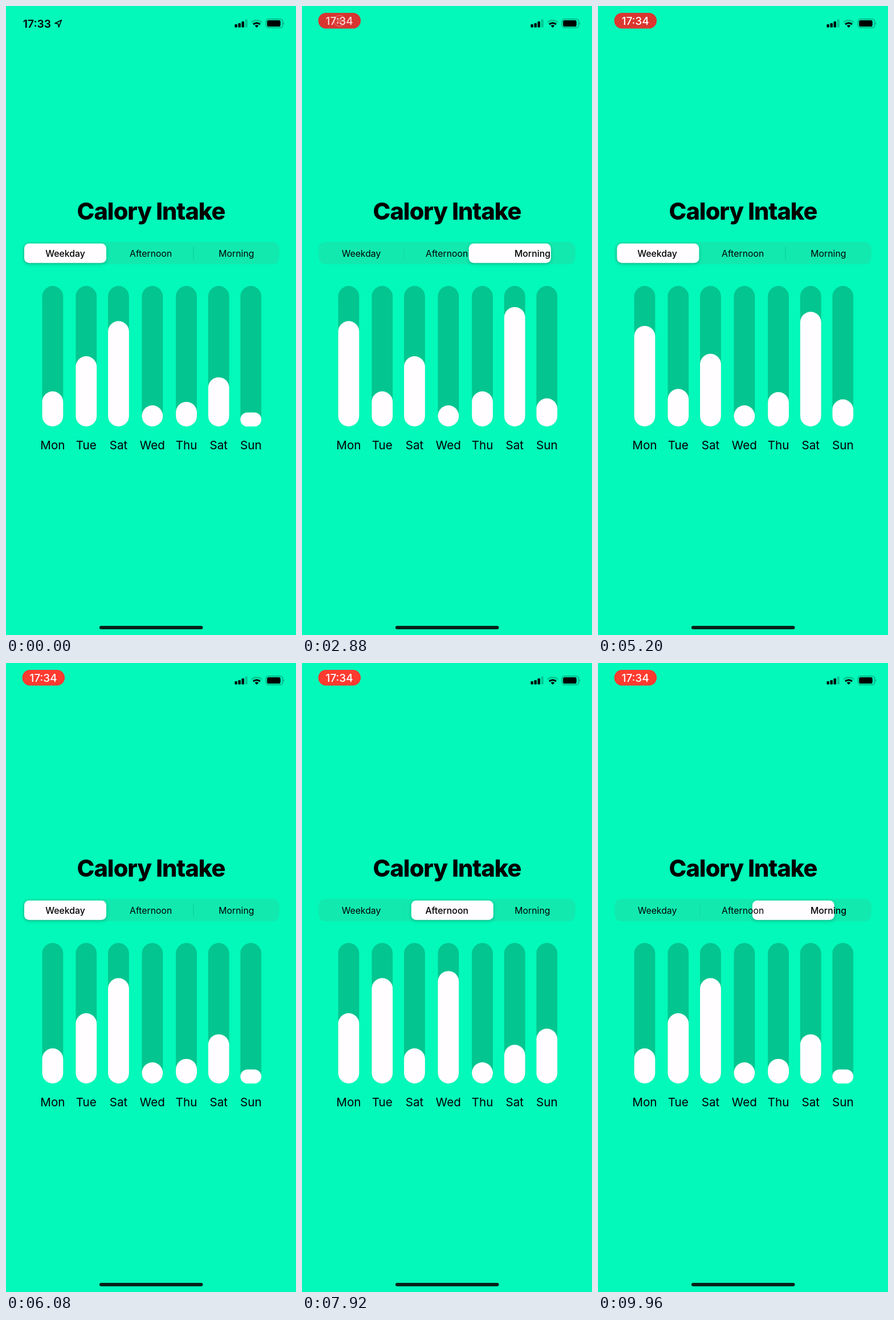
Animation of 509 by 1101 pixels, one loop 10 s. Source, as an HTML page:

```html
<!DOCTYPE html>
<html lang="en">
<head>
<meta charset="utf-8">
<title>Calory Intake</title>
<style>
  html, body { margin: 0; width: 100%; height: 100%; overflow: hidden; background: #02f9b9; }
  svg { display: block; width: 100vw; height: 100vh; }
  text { font-family: Inter, "Open Sans", sans-serif; font-optical-sizing: none; text-anchor: middle; }
  .title { font-size: 41.5px; font-weight: 800; letter-spacing: -1px; }
  .day { font-size: 20.7px; }
  .tab { font-size: 15.8px; }
  .clock { font-size: 19.3px; font-weight: 600; }
  .white { fill: #fffdff; }
  .faint { fill: #04c894; }
  #knob { filter: drop-shadow(0 2px 3px #0003); }
</style>
</head>
<body>
<svg id="stage" viewBox="0 0 509 1101">
  <g id="idle">
    <text class="clock" x="54.5" y="38">17:33</text>
    <path d="M97.3 24.8 86 30.3l5.6.9.9 5.8z" fill="none" stroke="#000" stroke-width="1.6" stroke-linejoin="round"/>
  </g>
  <g id="live">
    <rect id="pill" x="28.5" y="12" width="74.5" height="27.5" rx="13.5"/>
    <g id="record">
      <circle cx="65.8" cy="26" r="9.5" fill="none" stroke="#fff" stroke-width="2"/>
      <circle cx="65.8" cy="26" r="5" fill="#fff"/>
    </g>
    <text id="time" x="65.6" y="33" fill="#fff" font-size="18.9" font-weight="500">17:34</text>
  </g>

  <rect x="401.5" y="32" width="4.4" height="5.6" rx="1"/>
  <rect x="407.5" y="30" width="4.4" height="7.6" rx="1"/>
  <rect x="413.5" y="27" width="4.4" height="10.6" rx="1"/>
  <rect class="faint" x="419.5" y="23.5" width="4.4" height="14.1" rx="1"/>
  <g fill="none" stroke-width="3">
    <path d="M431 29a12.8 12.8 0 0 1 18 0" stroke="#04c894"/>
    <path d="M434.1 32.1a8.3 8.3 0 0 1 11.8 0" stroke="#000"/>
  </g>
  <path d="M440 38l-3.3-3.4a4.7 4.7 0 0 1 6.6 0z"/>
  <rect x="456.2" y="23" width="29.6" height="15" rx="4.5" fill="none" stroke="#04a67c" stroke-width="1.3"/>
  <rect x="458.2" y="25" width="23.6" height="11" rx="2.8"/>
  <path d="M487.2 28q2.4 2.5 0 5z" fill="#04a67c"/>

  <text class="title" x="254.5" y="373.5">Calory Intake</text>

  <rect x="29.5" y="413" width="450" height="39" rx="11" fill="#12e9af"/>
  <g fill="#0dd39f">
    <rect id="sepLeft" x="178.5" y="421" width="1.4" height="23"/>
    <rect id="sepRight" x="328.5" y="421" width="1.4" height="23"/>
  </g>
  <rect id="knob" class="white" y="415.8" width="144" height="34" rx="8.5"/>
  <g id="tabs"></g>
  <g id="chart"></g>
  <rect x="164" y="1085" width="181.5" height="6" rx="3" fill="#08211a"/>
</svg>
<script>
const LOOP = 10000;
const BASE = 736, TRACK = 246, BAR = 36.8;
const el = id => document.getElementById(id);

function add(parent, tag, attrs, text = '') {
  const node = document.createElementNS('http://www.w3.org/2000/svg', tag);
  for (const key in attrs) node.setAttribute(key, attrs[key]);
  node.textContent = text;
  return parent.appendChild(node);
}

// Tabs: 0 weekday, 1 afternoon, 2 morning
const knobX = [32, 182, 332.5];
const levels = [
  [.25, .5, .75, .15, .175, .35, .1],
  [.75, .25, .5, .15, .25, .85, .2],
  [.5, .75, .25, .8, .15, .275, .39]
];
const taps = [[1605, 1], [2750, 2], [3950, 1], [4865, 0],
              [6540, 2], [7700, 1], [8830, 0], [9813, 2]];

const tabs = ['Weekday', 'Afternoon', 'Morning'].map((name, i) =>
  add(el('tabs'), 'text', { class: 'tab', x: 104 + 150.2 * i, y: 438.5 }, name));

const barX = [63.5, 122.4, 179.1, 238.5, 298.2, 354.9, 411.4];
const bars = ['Mon', 'Tue', 'Sat', 'Wed', 'Thu', 'Sat', 'Sun'].map((day, i) => {
  const x = barX[i], chart = el('chart');
  add(chart, 'rect', { x, y: BASE - TRACK, width: BAR, height: TRACK, rx: BAR / 2, fill: '#03c590' });
  add(chart, 'text', { class: 'day', x: x + BAR / 2, y: 775.8 }, day);
  return add(chart, 'rect', { class: 'white', x, width: BAR });
});

const clamp = v => Math.min(1, Math.max(0, v));
const smooth = v => (v = clamp(v), v * v * (3 - 2 * v));
const spring = ms => ms <= 0 ? 0 : 1 - (1 + ms / 50) * Math.exp(-ms / 50);
const glide = ms => smooth((ms - 280) / 350);
const fade = ms => smooth(ms / 300);

// Moves a per-tab value through every tap made so far
const follow = (t, ease, value) => taps.reduce(
  (v, [at, tab]) => v + (value(tab) - v) * ease(t - at), value(0));

const show = (id, on) => el(id).style.opacity = on;

function draw(t) {
  el('knob').setAttribute('x', follow(t, spring, tab => knobX[tab]));
  show('sepLeft', follow(t, fade, tab => +(tab === 2)));
  show('sepRight', follow(t, fade, tab => +(tab === 0)));

  const selected = taps.reduce((s, [at, tab]) => t >= at ? tab : s, 0);
  tabs.forEach((node, i) => {
    let dim = 0;
    for (const [at, tab] of taps)
      if (tab === i) dim += clamp((t - at + 120) / 80) * clamp(1 - (t - at) / 120);
    node.style.opacity = 1 - dim / 2;
    node.style.fontWeight = i === selected ? 500 : 400;
  });

  bars.forEach((bar, i) => {
    const h = TRACK * follow(t, glide, tab => levels[tab][i]);
    bar.setAttribute('y', BASE - h);
    bar.setAttribute('height', h);
    bar.setAttribute('rx', Math.min(BAR, h) / 2);
  });

  const live = smooth((t - 450) / 200), clock = smooth((t - 2700) / 250);
  show('idle', 1 - live);
  show('live', live);
  show('record', 1 - clock);
  show('time', clock);
  const glow = (1 + Math.cos(t * Math.PI / 1000)) / 2;
  el('pill').setAttribute('fill', `rgb(${216 + 39 * glow}, ${53 + 6 * glow}, 48)`);
}

const start = performance.now();
function tick() {
  draw((performance.now() - start) % LOOP);
  requestAnimationFrame(tick);
}
tick();
</script>
</body>
</html>
```
